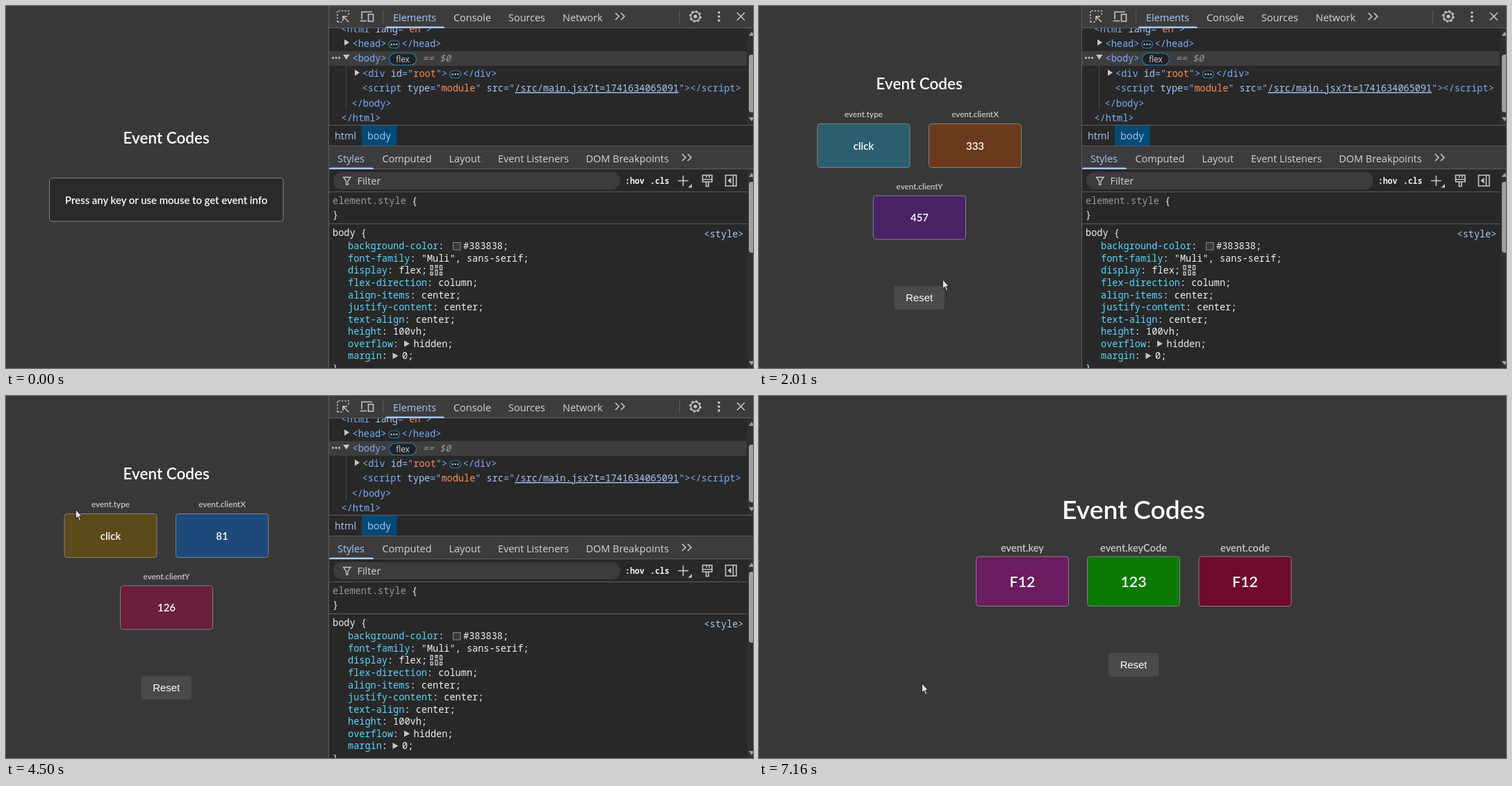
An HTML page that plays this animation: 1075x521 px, repeating every 8 s.

```html
<!DOCTYPE html>
<html lang="en">
<head>
<meta charset="utf-8">
<title>Event Codes</title>
<style>
  html, body { margin: 0; width: 100%; height: 100%; overflow: hidden; background: #383838; }
  svg { display: block; width: 1075px; height: 521px; }
  text { white-space: pre; }
  .page { font-family: Lato, sans-serif; font-weight: 600; text-anchor: middle; fill: #fff; }
  .page rect { stroke: #838383; }
  .label { fill: #c9c9c9; }
  .reset { font-family: "Liberation Sans", Arial, sans-serif; font-size: 14.8px; font-weight: 400; }
  .page .button { fill: #4a4a4a; stroke: none; }
  .ui { font: 500 14.45px "Open Sans", "Noto Sans", sans-serif; fill: #d6d6d6; }
  .code { font: 500 13.57px "Noto Sans Mono", monospace; fill: #f0f0f0; }
  .small { font-size: 11.5px; font-weight: 600; }
  .tag { fill: #7cacf8; }
  .attr { fill: #a8c7fa; }
  .val { fill: #fe8d59; }
  .prop { fill: #5cd5fb; }
  .dim { fill: #9a9a9a; }
  .on { fill: #a8c7fa; }
  .line { stroke: #5e5e5e; fill: none; }
  .guide { stroke: #4a4a4a; }
  .icon { stroke: #c7c7c7; stroke-width: 1.6; fill: none; }
  .thin { stroke-width: 1.3; }
  .dots { stroke-width: 2.4; stroke-linecap: round; }
  .big { stroke-width: 3.6; }
  .badge { fill: #202124; stroke: #1f7fb0; stroke-width: 1.2; }
  .grey { fill: #c7c7c7; }
  .thumb { fill: #9f9f9f; }
</style>
</head>
<body>
<svg viewBox="0 0 1075 521">
  <rect width="1075" height="521" fill="#383838"/>

  <g id="page" class="page">
    <text id="title">Event Codes</text>
    <g id="prompt">
      <rect x="62.5" y="247.5" width="336.5" height="62.5" rx="4" fill="#2a2a2a"/>
      <text x="230.7" y="284.6" font-size="14.9">Press any key or use mouse to get event info</text>
    </g>
    <g id="info">
      <g id="cards"></g>
      <g id="reset">
        <rect class="button" x="-36.3" width="72.5" height="34" rx="4"/>
        <text class="reset" y="22">Reset</text>
      </g>
    </g>
  </g>

  <g id="tools">
    <rect x="464" width="611" height="521" fill="#282828"/>
    <rect x="465" width="610" height="31" fill="#3c3c3c"/>
    <rect x="465" y="202" width="610" height="32" fill="#3c3c3c"/>
    <rect x="465" y="65" width="601" height="21" fill="#3d3d3d"/>
    <rect x="512" y="172" width="50.5" height="29" fill="#004a77"/>
    <path class="line" d="M464.5 0V521M465 31.5H1075M465 171.5H1075M465 201.5H1075M465 234.5H1075M465 267.5H1067M465 313.5H1067M542.5 6V25M969.5 6V25"/>
    <path class="guide" d="M489.5 86V150"/>
    <path fill="#a8c7fa" d="M546 32v-.5q0-2 2-2h81q2 0 2 2v.5zM465 235v-.5q0-2 2-2h60q2 0 2 2v.5z"/>

    <!-- toolbar -->
    <path class="icon" stroke-dasharray="2.2 2.2" d="M477 23V7H493V13M477 23H484"/>
    <path class="icon" d="M493 23L485 15M485 21V15H491"/>
    <path class="icon" d="M512 19V8.5H527M509.5 21.5H519M521.5 12H528.5V22H521.5Z"/>
    <g class="ui">
      <text class="on" x="557" y="22">Elements</text>
      <text x="644" y="22">Console</text>
      <text x="723" y="22">Sources</text>
      <text x="801" y="22">Network</text>
      <text x="473" y="192" class="on" font-weight="400">html</text>
      <text x="520" y="192" class="on" font-weight="400">body</text>
      <text class="on" x="477" y="225">Styles</text>
      <text x="541.5" y="225">Computed</text>
      <text x="637.5" y="225">Layout</text>
      <text x="708" y="225">Event Listeners</text>
      <text x="834.5" y="225">DOM Breakpoints</text>
    </g>
    <path class="icon" d="M877 10l5 5-5 5M885 10l5 5-5 5M973 213l5 5-5 5M981 213l5 5-5 5"/>
    <circle class="icon" cx="992" cy="15" r="6.5"/>
    <circle class="icon" cx="992" cy="15" r="8" stroke-dasharray="3.1 3.18"/>
    <circle cx="992" cy="15" r="2.6" class="grey"/>
    <path class="icon dots big" d="M1026 9.5h.01M1026 15.3h.01M1026 21h.01"/>
    <path class="icon" d="M1052 9.5l11 11M1063 9.5l-11 11"/>

    <!-- element tree -->
    <clipPath id="tree"><rect x="465" y="32" width="610" height="139"/></clipPath>
    <g class="code" clip-path="url(#tree)">
      <text x="482.5" y="38"><tspan class="tag">&lt;html</tspan> <tspan class="attr">lang</tspan><tspan class="tag">="</tspan><tspan class="val">en</tspan><tspan class="tag">"&gt;</tspan></text>
      <text class="tag" x="498.5" y="59">&lt;head&gt;</text>
      <text class="tag" x="569.5" y="59">&lt;/head&gt;</text>
      <text class="tag" x="498.5" y="80">&lt;body&gt;</text>
      <text class="dim" x="599.5" y="80" font-style="italic">== $0</text>
      <text class="tag" x="513" y="102">&lt;div <tspan class="attr">id</tspan>="<tspan class="val">root</tspan>"&gt;</text>
      <text class="tag" x="657.5" y="102">&lt;/div&gt;</text>
      <text class="tag" x="512.5" y="123">&lt;script <tspan class="attr">type</tspan>="<tspan class="val">module</tspan>" <tspan class="attr">src</tspan>="<tspan class="attr" text-decoration="underline">/src/main.jsx?t=1741634065091</tspan>"&gt;&lt;/script&gt;</text>
      <text class="tag" x="497.5" y="145">&lt;/body&gt;</text>
      <text class="tag" x="482.5" y="166">&lt;/html&gt;</text>
    </g>
    <path class="grey" d="M487 48l7 4.5-7 4.5zM502 91.5l7 4.5-7 4.5zM485 70h9.5l-4.75 7z"/>
    <rect class="badge" x="550.5" y="50" width="16" height="10.5" rx="5.25"/>
    <rect class="badge" x="638.5" y="93" width="16" height="10.5" rx="5.25"/>
    <rect class="badge" x="551.5" y="68" width="39" height="17" rx="8.5"/>
    <text class="ui" x="571" y="80.5" style="font-size:11.8px;text-anchor:middle">flex</text>
    <path class="icon dots" d="M554.5 55.3h.01M558.5 55.3h.01M562.5 55.3h.01M642.5 98.3h.01M646.5 98.3h.01M650.5 98.3h.01"/>
    <path class="icon dots" style="stroke-width:3" d="M470.5 74.5h.01M475 74.5h.01M479.5 74.5h.01"/>

    <!-- filter bar -->
    <rect x="471" y="239" width="413" height="25" rx="12.5" fill="#3c3c3c"/>
    <path class="icon thin" d="M485.5 246.5H496L492 252V257H489.5V252Z"/>
    <text class="ui" x="505.5" y="257" style="font-weight:400">Filter</text>
    <g class="code">
      <text class="small" x="891" y="255.5">:hov</text>
      <text class="small" x="927" y="255.5">.cls</text>
    </g>
    <path class="icon" d="M967 251.5H982M974.5 244V259"/>
    <path class="grey" d="M987 256v5.5h-5.5z"/>
    <path class="icon" d="M1002.5 243.5H1016V253H1002.5ZM1002.5 249.5H1016M1007.5 253V259.5H1011V253M1008 244V247M1012 244V247"/>
    <path class="icon" d="M1035.5 243.5H1051V259H1035.5ZM1046.5 243.5V259"/>
    <path class="grey" d="M1043.5 247v8.5l-5-4.25z"/>

    <!-- style rules -->
    <g class="code">
      <text class="dim" x="470" y="284.5">element.style <tspan fill="#f0f0f0">{</tspan></text>
      <text x="470" y="305">}</text>
      <text x="470" y="331">body {</text>
      <text class="attr" x="1004.5" y="333">&lt;style&gt;</text>
      <g id="rules"></g>
      <text x="470" y="526">}</text>
    </g>
    <rect x="643.5" y="340.5" width="10.5" height="10.5" fill="#383838" stroke="#8c8c8c"/>
    <path class="icon thin" d="M611 373.5h3v6h-3zM618 373.5h3v3h-3zM624.5 373.5h3v6h-3zM611 383h3v4h-3zM618 380h3v7h-3zM624.5 383h3v4h-3z"/>
    <path class="grey" d="M573 481.5l8 4.5-8 4.5zM556.5 499l8 4.5-8 4.5z"/>

    <!-- scrollbars -->
    <path fill="#2f2f2f" d="M1067 32h8v139h-8zM1067 236h8v285h-8z"/>
    <rect class="thumb" x="1069" y="70" width="10" height="83" rx="4"/>
    <rect class="thumb" x="1069" y="253" width="10" height="102" rx="4"/>
    <path class="thumb" d="M1069 43l4-6 4 6zM1069 160h8l-4 6zM1069 246l4-6 4 6zM1069 511h8l-4 6z"/>
  </g>

  <g id="cursor">
    <circle id="press" r="12" fill="#ffe14d" opacity=".45"/>
    <path id="arrow" fill="#e4e4e4" stroke="#111" stroke-width=".9" d="M0 0V13.5L3 10.7 5.3 16.2 7.5 15.2 5.2 10H9Z"/>
    <path id="hand" fill="#e4e4e4" stroke="#111" stroke-width=".9" d="M-1.5 9V.8Q-.2-1.5 1.2.8V5.5Q2.6 4.3 3.7 6 5 5 6 6.7 7.5 6 8.2 7.8V12Q7.5 14 6.8 16.5H.2Q-1.5 13.5-4 10.5-4.5 8-1.5 9Z"/>
  </g>
</svg>
<script>
const LOOP = 8000;
const NS = "http://www.w3.org/2000/svg";
const $ = id => document.getElementById(id);

function add(parent, name, attrs = {}, text = "") {
  const el = document.createElementNS(NS, name);
  set(el, attrs);
  el.textContent = text;
  return parent.appendChild(el);
}
function set(el, attrs) {
  for (const key in attrs) el.setAttribute(key, attrs[key]);
}
function show(el, on) {
  el.style.display = on ? "" : "none";
}

const rules = [
  ["background-color", "", "#383838", 658],
  ["font-family", '"Muli", sans-serif'],
  ["display", "flex"],
  ["flex-direction", "column"],
  ["align-items", "center"],
  ["justify-content", "center"],
  ["text-align", "center"],
  ["height", "100vh"],
  ["overflow", "", "hidden", 586.5],
  ["margin", "", "0", 570]
];
rules.forEach(([prop, value, late, x], i) => {
  const y = 350.3 + i * 17.55;
  const row = add($("rules"), "text", { x: 492, y });
  add(row, "tspan", { class: "prop" }, prop);
  add(row, "tspan", {}, value ? `: ${value};` : ":");
  if (late) add($("rules"), "text", { x, y }, late + ";");
});

const cards = [0, 1, 2].map(() => ({
  box: add($("cards"), "rect", { width: 133, rx: 4 }),
  label: add($("cards"), "text", { class: "label" }),
  value: add($("cards"), "text")
}));

const narrow = {
  spots: [[84, 169.5], [244.5, 169.5], [164.5, 273]], height: 63, drop: 37,
  label: 11.7, gap: 9.5, value: 15, title: [230.7, 120, 22.5], reset: [230.7, 403]
};
const wide = {
  spots: [[312.5, 231], [472.5, 231], [633, 231]], height: 71.5, drop: 44,
  label: 14.6, gap: 7, value: 21.4, title: [539, 177, 37.3], reset: [539, 369.7]
};

const mouse = ["event.type", "event.clientX", "event.clientY"];
const keys = ["event.key", "event.keyCode", "event.code"];
const f12 = { labels: keys, values: ["F12", 123, "F12"], fills: ["#6c1c60", "#0a7a02", "#700a2a"] };
const click = (x, y, ...fills) => ({ labels: mouse, values: ["click", x, y], fills, layout: narrow });
const states = [
  [0, null],
  [1150, click(321, 340, "#6a7f2b", "#8b1410", "#38356c")],
  [1900, click(333, 457, "#2b5f70", "#6b3a1c", "#4a2266")],
  [2770, click(145, 386, "#78286f", "#25138f", "#577a55")],
  [3300, click(448, 119, "#451955", "#05584e", "#0f055b")],
  [4380, click(81, 126, "#5c4a1a", "#1d4a7a", "#6a1f3c")],
  [5100, null],
  [7030, { ...f12, layout: narrow }],
  [7100, { ...f12, layout: wide }]
];

// time, x, y
const path = [
  [320, 700, 521], [1010, 284, 302], [1410, 284, 302], [1760, 294, 405], [1900, 294, 405],
  [2200, 198, 368], [2540, 128.5, 341.5], [2770, 128.5, 341.5], [3180, 397, 106],
  [3300, 397, 106], [3510, 315, 110], [3850, 72.5, 111.5], [4380, 72.5, 111.5],
  [4840, 234.5, 413.5], [LOOP, 234.5, 413.5]
];
const presses = [[1010, 1150], [1760, 1900], [2610, 2770], [3180, 3300], [4240, 4380], [5040, 5100]];
const hands = [[4780, 5100], [7030, 7160]];
const within = (spans, t) => spans.some(([a, b]) => t >= a && t < b);

function place(t) {
  const i = Math.max(1, path.findIndex(p => p[0] > t));
  const [a, x0, y0] = path[i - 1], [b, x1, y1] = path[i];
  const u = (t - a) / (b - a), k = u * u * (3 - 2 * u);
  return [x0 + (x1 - x0) * k, y0 + (y1 - y0) * k];
}

function drawPage(state) {
  const layout = state ? state.layout : narrow;
  const [x, y, size] = state ? layout.title : [230.7, 198, 22.5];
  set($("title"), { x, y, "font-size": size });
  show($("prompt"), !state);
  show($("info"), state);
  show($("tools"), layout === narrow);
  if (!state) return;
  set($("reset"), { transform: `translate(${layout.reset})` });
  cards.forEach(({ box, label, value }, i) => {
    const [left, top] = layout.spots[i], mid = left + 66.5;
    set(box, { x: left, y: top, height: layout.height, fill: state.fills[i] });
    set(label, { x: mid, y: top - layout.gap, "font-size": layout.label });
    set(value, { x: mid, y: top + layout.drop, "font-size": layout.value });
    label.textContent = state.labels[i];
    value.textContent = state.values[i];
  });
}

const start = performance.now();
let current;
function frame() {
  const t = (performance.now() - start) % LOOP;
  const step = states.filter(s => s[0] <= t).pop();
  if (step !== current) drawPage((current = step)[1]);
  const hand = within(hands, t);
  show($("cursor"), t >= 320);
  show($("hand"), hand);
  show($("arrow"), !hand);
  show($("press"), within(presses, t));
  if (t >= 320) set($("cursor"), { transform: `translate(${place(t)})` });
  requestAnimationFrame(frame);
}
frame();
</script>
</body>
</html>
```
